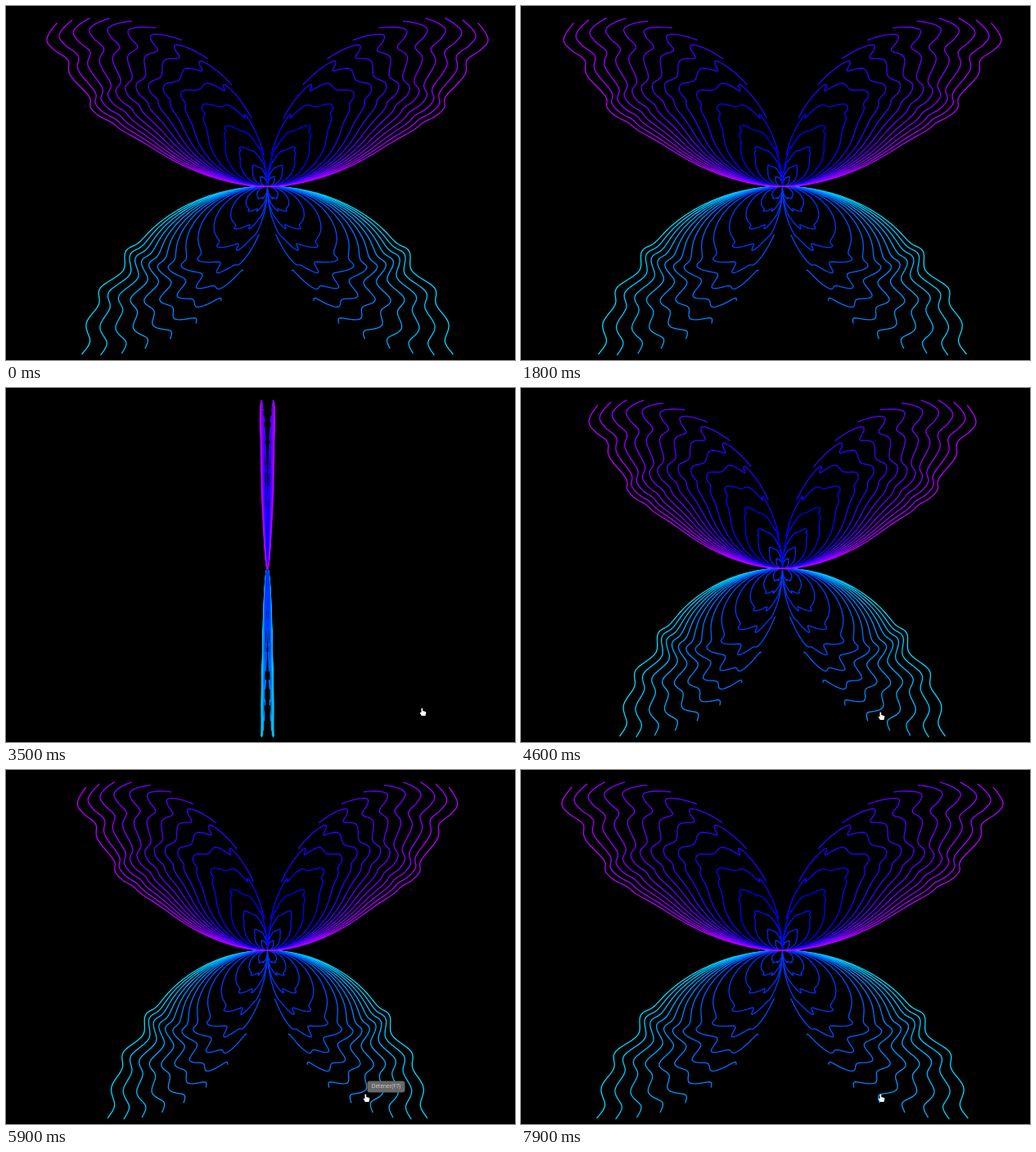
These frames come from a looping animation (622 px wide and 432 px high, 8000 ms). An HTML page with a canvas:

```html
<!DOCTYPE html>
<html lang="es">
<head>
<meta charset="utf-8">
<style>
html, body { margin: 0; width: 100%; height: 100%; overflow: hidden; background: #000; }
canvas { display: block; }
</style>
</head>
<body>
<canvas id="stage" width="622" height="432"></canvas>
<script>
const ctx = document.getElementById('stage').getContext('2d');
const LOOP = 8000, CX = 319.5, CY = 220.3, DIAMETER = 412, STEP = 0.1172;

// Wing outlines: [share of the end angle, share of the envelope circle]
const UPPER = [[0, 0], [.23, .148], [.484, .375], [.56, .5], [.59, .538], [.6, .584],
  [.636, .629], [.71, .665], [.78, .773], [.855, .828], [.863, .892], [.891, .945], [1, 1]];
const LOWER = [[0, 0], [.18, .147], [.428, .348], [.555, .449], [.58, .506], [.717, .572],
  [.741, .677], [.829, .743], [.879, .842], [.975, .925], [1, 1]];

// Each flap: closed, fully open, closed again
const FLAPS = [[-1000, 0, 1005], [1005, 2120, 3515], [4060, 5300, 6330], [6600, 7850, 9000]];

const ramp = (t, from, to) => Math.min(1, Math.max(0, (t - from) / (to - from)));

// The wing angle accelerates away from the open pose
function openness(t) {
  const flap = FLAPS.find(f => t < f[2]);
  const [from, peak, to] = flap;
  const d = Math.min(1, (t - peak) / ((t < peak ? from : to) - peak));
  return Math.max(0.008, Math.cos(d * d * Math.PI / 2));
}

// Catmull-Rom interpolation through the outline points
function spline(pts, sub = 6) {
  const out = [];
  for (let i = 0; i < pts.length - 1; i++) {
    const a = pts[i], b = pts[i + 1];
    const p = pts[i - 1] || a, n = pts[i + 2] || b;
    const blend = (c, u) => {
      const cubic = 3 * (a[c] - b[c]) + n[c] - p[c];
      const square = 2 * p[c] - 5 * a[c] + 4 * b[c] - n[c];
      return a[c] + 0.5 * u * (b[c] - p[c] + u * (square + u * cubic));
    };
    for (let s = 0; s < sub; s++) out.push([blend(0, s / sub), blend(1, s / sub)]);
  }
  out.push(pts[pts.length - 1]);
  return out;
}

// Curves start at the centre and end on a circle; inner ones shrink to leaves
function curve(profile, m, side, hue) {
  const end = Math.PI / 2 - Math.atan(Math.max(0, m));
  const size = DIAMETER / (1 + Math.exp(-(m + 0.07) / 0.13));
  const points = profile.map(([q, h]) => {
    const a = q * end, r = size * h * Math.cos(a);
    return [r * Math.cos(a), CY - side * r * Math.sin(a)];
  });
  return { points, color: `hsl(${hue},100%,50%)` };
}

const curves = [];
const upper = spline(UPPER), lower = spline(LOWER);
for (let i = 7; i >= -5; i--) {
  const m = 0.287 + STEP * i;
  curves.push(curve(lower, m, -1, 228 - 36 * Math.max(0, m)));
}
for (let j = -3; j <= 11; j++) {
  const m = STEP * j;
  curves.push(curve(upper, m, 1, 240 + 33 * m));
}

function drawWings(scale) {
  ctx.lineWidth = 1.3;
  ctx.lineJoin = 'round';
  for (const { points, color } of curves) {
    ctx.strokeStyle = color;
    ctx.beginPath();
    for (const dir of [-scale, scale]) {
      points.forEach(([x, y], i) => ctx[i ? 'lineTo' : 'moveTo'](CX + dir * x, y));
    }
    ctx.stroke();
  }
}

const ARROW = new Path2D('M-.5 0V8L1.4 6.4L2.8 9.3L4 8.7L2.7 6H5Z');
const HAND = new Path2D('M-1.5 0Q-.6-1 .2 0V3L3.8 4Q4.5 4.4 4.3 5.5L3.5 9H-1.2L-3.2 5.6Q-3.4 4.2-1.5 5.2Z');

function drawPointer(t) {
  if (t < 2100) return;
  const enter = ramp(t, 2100, 2500), cross = ramp(t, 2600, 3300), settle = ramp(t, 3700, 4200);
  ctx.save();
  ctx.translate(615 - 27 * enter - 79 * cross - 69 * settle, 404 - 7 * enter - 6 * cross + 5 * settle);
  ctx.fillStyle = '#fff';
  ctx.fill(t < 3500 ? ARROW : HAND);
  ctx.restore();
}

function drawTip() {
  ctx.fillStyle = '#686868';
  ctx.beginPath();
  ctx.roundRect(441.5, 379.5, 46, 14, 3);
  ctx.fill();
  ctx.fillStyle = '#d4d4d4';
  ctx.font = '6.5px "Open Sans", sans-serif';
  ctx.textAlign = 'center';
  ctx.textBaseline = 'middle';
  ctx.fillText('Detener(F7)', 464.5, 386.7);
}

function frame() {
  const t = Math.floor(performance.now() % LOOP / 100) * 100;
  ctx.fillStyle = '#000';
  ctx.fillRect(0, 0, 622, 432);
  drawWings(openness(t));
  if (t >= 5000 && t < 6700) drawTip();
  drawPointer(t);
  requestAnimationFrame(frame);
}
requestAnimationFrame(frame);
</script>
</body>
</html>
```
